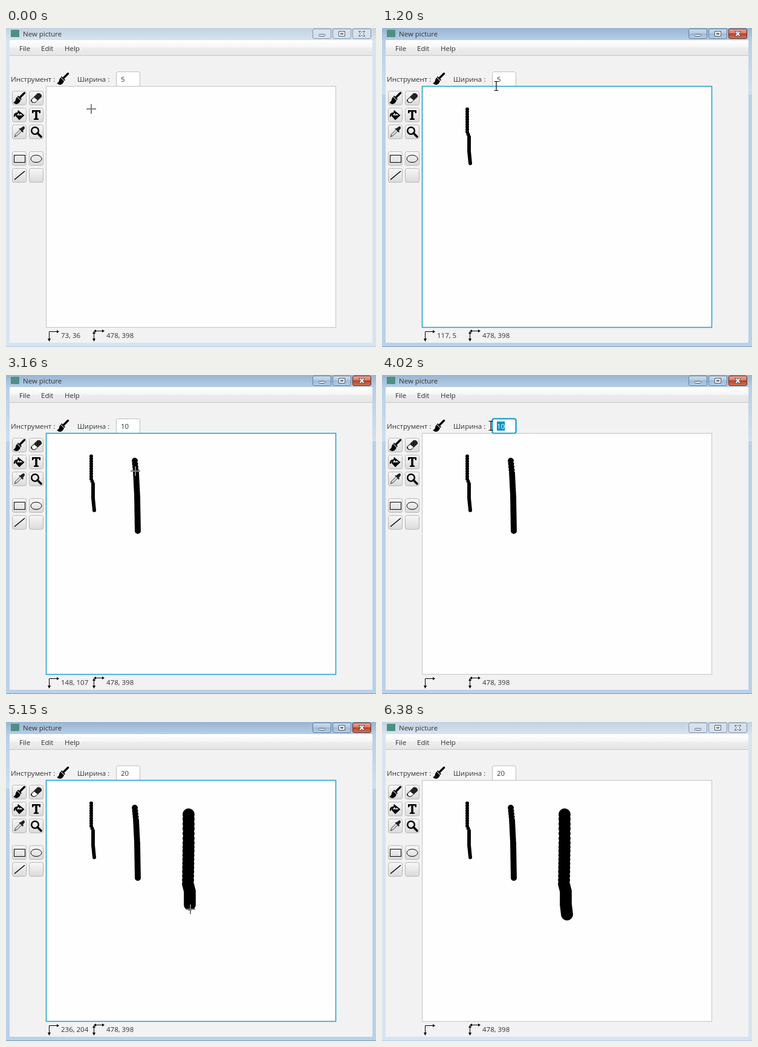
Write an HTML page that moves like this. It is 612 px wide and 528 px high and loops after 6.44 s.

```html
<!DOCTYPE html>
<html lang="ru">
<head>
<meta charset="utf-8">
<title>New picture</title>
<style>
html, body { margin: 0; width: 100%; height: 100%; overflow: hidden; background: #d7e4f1; }
svg { display: block; width: 612px; height: 528px; }
text { font: 11.5px "Open Sans", "Noto Sans", sans-serif; fill: #333; white-space: pre; }
.line { fill: none; stroke: #000; }
.dab { fill: none; stroke: #000; stroke-linecap: round; }
.hidden { display: none; }
</style>
</head>
<body>
<svg viewBox="0 0 612 528">
  <defs>
    <linearGradient id="idle" x2="0" y2="1">
      <stop stop-color="#c4d1de"/><stop offset=".04" stop-color="#d7e4f1"/>
    </linearGradient>
    <linearGradient id="live" x2="0" y2="1">
      <stop stop-color="#98b5d2"/><stop offset=".04" stop-color="#b8cfe7"/>
      <stop offset=".208" stop-color="#cfe0f1"/><stop offset=".208" stop-color="#b9d1ea"/>
    </linearGradient>
    <linearGradient id="menu" x2="0" y2="1">
      <stop stop-color="#fff"/><stop offset=".45" stop-color="#f6f6f6"/>
      <stop offset=".5" stop-color="#ededed"/><stop offset="1" stop-color="#e5e5e5"/>
    </linearGradient>
    <linearGradient id="btn" x2="0" y2="1">
      <stop stop-color="#f7f7f7"/><stop offset="1" stop-color="#dadada"/>
    </linearGradient>
    <linearGradient id="cap" x2="0" y2="1">
      <stop stop-color="#c9dbee"/><stop offset=".5" stop-color="#b3cae2"/>
      <stop offset=".5" stop-color="#9db9d6"/><stop offset="1" stop-color="#b6d0e8"/>
    </linearGradient>
    <linearGradient id="red" x2="0" y2="1">
      <stop stop-color="#e9a99b"/><stop offset=".5" stop-color="#d5735d"/>
      <stop offset=".5" stop-color="#bf3d22"/><stop offset="1" stop-color="#d5785a"/>
    </linearGradient>
    <g id="brush">
      <path d="M18.5 1.5L11.5 8.5" stroke="#000" stroke-width="3.4" stroke-linecap="round"/>
      <path d="M8 6L14 12L12.6 13.2L6.8 7.4Z"/>
      <path d="M6 8L12 14Q10 19 6 20Q3 20 0 17.5Q4 15.5 4 12Z"/>
    </g>
  </defs>

  <rect id="frame" width="612" height="528"/>
  <path id="edge" d="M0 527.5H612" stroke="#7f9cb8"/>
  <rect x="8" y="3" width="14" height="12" fill="#4f8f83"/>
  <text x="28" y="14">New picture</text>
  <g id="caption" fill="#fff" stroke="#4d5663">
    <rect x="10.5" y="10.5" width="10" height="3" rx="1"/>
    <path d="M10.5 5.5h10v8h-10zM13.5 8.5v2h4v-2z" fill-rule="evenodd"/>
    <path d="M10.5 5.5h3l2 2l2-2h3l-3 4l3 4h-3l-2-2l-2 2h-3l3-4z"/>
  </g>

  <rect x="6" y="20" width="600" height="501" fill="#f2f2f2"/>
  <rect x="6" y="20" width="600" height="26" fill="url(#menu)"/>
  <path d="M6 45.5H606" stroke="#c6c6c6"/>
  <text x="22" y="38">File</text><text x="58" y="38">Edit</text><text x="97" y="38">Help</text>

  <text x="8" y="89">Инструмент :</text>
  <use href="#brush" x="84" y="74"/>
  <text x="118" y="89">Ширина :</text>

  <g id="tools">
    <use href="#brush"/>
    <g><path d="M1 13L12 2h4l3 3v3L8 18H4L1 15z" fill="#222"/><path d="M2.5 13l4-4l5.500 4.500l-4.500 3.500h-3z" fill="#fff"/></g>
    <g><path d="M9 4l8 6.500L10 17L4.500 11zM11 9L8 2.500" fill="#fff" stroke="#000" stroke-width="2"/><path d="M5 10.500h12L10 17zM5 6Q0 7 1 14Q3 13 4 9l4-3z"/></g>
    <path d="M3 2h14v5h-2l-1-2.500h-2.300v11l2.300.5v2H6v-2l2.300-.5v-11H6L5 7H3z"/>
    <g><path d="M9 4.500L15.500 11L17 9.500L16 8l3-4Q19 0 16 1l-4 3z" fill="#222"/><path d="M11 6.500l-7 7L2 18l4.500-2l7-7" fill="#ddd" stroke="#333"/></g>
    <g class="line"><circle cx="8" cy="8" r="5.800" stroke-width="2.400"/><path d="M12 12l6 6" stroke-width="3.600" stroke-linecap="round"/></g>
    <rect class="line" x="1.500" y="4.500" width="18" height="12"/>
    <ellipse class="line" cx="10" cy="10.500" rx="9" ry="6"/>
    <path class="line" d="M2 17L19 3" stroke-width="1.600"/>
    <g></g>
  </g>

  <g id="field">
    <rect id="box" x="182.5" y="72.5" width="39" height="24" rx="3" fill="#fff"/>
    <rect id="sel" x="190" y="77" height="15" fill="#0093c8"/>
    <text id="size" x="190" y="89"></text>
    <path id="caret" stroke="#000"/>
  </g>
  <rect id="sheet" x="66.5" y="96.5" width="479" height="399" fill="#fefefe"/>
  <use href="#field" id="fieldTop"/>
  <path class="dab" stroke-width="6"/>
  <path class="dab" stroke-width="10"/>
  <path class="dab" stroke-width="20"/>

  <path class="line" d="M71.5 516V502.5H86M145.5 504V516M147 501.5H161"/>
  <path d="M69 514h5l-2.5 5zM84 500v5l4-2.5zM143 506h5l-2.5-4zM143 514h5l-2.5 5zM149 499v5l-4-2.5zM159 499v5l4-2.5z"/>
  <text id="pos" x="91" y="513"></text>
  <text x="166" y="513">478, 398</text>

  <g id="cursor">
    <path id="cross" d="M-8 0H8M0-8V8" stroke="#808080" stroke-width="2"/>
    <path id="beam" class="line" d="M-3.5-7.5h7M0-7.5v15M-3.5 7.5h7" stroke-width="1.2"/>
    <path id="arrow" d="M0 0v16l4-3.5l2.500 5.500l2.500-1l-2.500-5.500h5z" fill="#fff" stroke="#000"/>
  </g>
</svg>
<script>
const LOOP = 6440, STEP = 60;
const $ = id => document.getElementById(id);
const show = (id, on) => $(id).classList.toggle('hidden', !on);
const set = (id, attrs) => { for (const k in attrs) $(id).setAttribute(k, attrs[k]); };

// Puts a glyph on a button plate
function plate(glyph, x, y, look) {
  const g = document.createElementNS('http://www.w3.org/2000/svg', 'g');
  g.innerHTML = `<rect x=".5" y=".5" ${look}/>`;
  g.setAttribute('transform', `translate(${x} ${y})`);
  glyph.replaceWith(g);
  g.append(glyph);
  return g.firstChild;
}
[...$('tools').children].forEach((icon, i) => {
  icon.setAttribute('transform', 'translate(2 2)');
  plate(icon, 10 + 28 * (i % 2), 104 + 28 * (i >> 1) + (i > 5 ? 16 : 0),
    'width="23" height="23" rx="3" fill="url(#btn)" stroke="#b8b8b8"');
});
const caps = [...$('caption').children].map((g, i) => {
  g.setAttribute('transform', 'translate(0 -1)');
  return plate(g, 507 + 33 * i, 1, 'width="30" height="16" rx="2.5"');
});

// Pen strokes: time, x, y, dab gap up to this point
const thin = [[430, 141, 134.4], [700, 141, 172, 4], [760, 144, 180, 4], [850, 144, 204, 1], [960, 146, 224, 1]];
const middle = [[2410, 213, 142], [2560, 215, 162, 5], [2740, 217, 200, 3], [2950, 218, 258, 1]];
const thick = [[4600, 302, 153], [4760, 302, 200, 8], [4990, 301, 268, 7], [5030, 304, 280, 4], [5090, 304, 302, 3], [5210, 306, 318.5, 1]];

// Pointer moves between the strokes
const toField = [[1020, 146, 224], [1140, 185, 103], [1200, 189, 96], [1320, 204, 84], [1500, 180, 84]];
const toMiddle = [[1780, 180, 84], [1980, 219, 164], [2040, 219, 174], [2350, 213, 142]];
const backUp = [[3040, 218, 258], [3100, 216, 205], [3160, 214, 159], [3280, 205, 86], [3560, 180, 84]];
const toThick = [[4190, 180, 84], [4360, 257, 128], [4540, 302, 153]];
const leave = [[5330, 306, 318], [5700, 519, 495], [5820, 550, 510]];

const strokes = [thin, middle, thick];
const path = [thin, toField, toMiddle, middle, backUp, toThick, thick, leave].flat();

// Interface states: time, focus, width text, mark in the field
const states = [
  [0, '', '5', ''], [430, 'sheet', '5', ''], [1320, 'field', '5', 'caret'], [1440, 'field', '5', 'sel'],
  [1620, 'field', '1', 'caret'], [1740, 'field', '10', 'caret'], [2410, 'sheet', '10', ''],
  [3340, 'field', '10', 'caret'], [3460, 'field', '10', 'sel'], [4070, 'field', '2', 'caret'],
  [4190, 'field', '20', 'caret'], [4600, 'sheet', '20', ''], [6380, '', '20', '']
];

// Screen updates come in bursts of equal steps
const bursts = [0, 430, 1080, 1740, 2410, 3100, 3770, 4420, 5090, 5760];
function snap(t) {
  const from = bursts.findLast(b => b <= t);
  return from + Math.floor((t - from) / STEP) * STEP;
}

const mix = (a, b, k) => [a[1] + (b[1] - a[1]) * k, a[2] + (b[2] - a[2]) * k];

function at(t) {
  const i = path.findIndex(p => p[0] > t);
  if (i === 0) return path[0].slice(1, 3);
  if (i < 0) return path.at(-1).slice(1, 3);
  const a = path[i - 1], b = path[i];
  return mix(a, b, (t - a[0]) / (b[0] - a[0]));
}

function trail(pts, t) {
  let d = `M${pts[0][1]} ${pts[0][2]}h0`;
  pts.slice(1).forEach((b, i) => {
    const a = pts[i];
    const n = Math.max(1, Math.round(Math.hypot(b[1] - a[1], b[2] - a[2]) / b[3]));
    for (let j = 1; j <= n; j++) {
      if (a[0] + (b[0] - a[0]) * j / n > t) return;
      d += 'M' + mix(a, b, j / n).map(v => v.toFixed(1)) + 'h0';
    }
  });
  return d;
}

const inSheet = ([x, y]) => x > 66 && x < 546 && y > 97 && y < 496;

function draw(time) {
  const t = snap(time), late = Math.max(0, t - STEP);
  const [, focus, text, mark] = states.findLast(s => s[0] <= time);
  const live = focus !== '', editing = focus === 'field';

  set('frame', { fill: live ? 'url(#live)' : 'url(#idle)' });
  set('edge', { opacity: live ? 1 : .35 });
  caps.forEach((c, i) => {
    c.setAttribute('fill', !live ? '#d5e1ee' : i === 2 ? 'url(#red)' : 'url(#cap)');
    c.setAttribute('stroke', !live ? '#8795a5' : i === 2 ? '#5c2a25' : '#64809d');
  });

  set('sheet', focus === 'sheet' ? { stroke: '#1a9fcb', 'stroke-width': 1.5 } : { stroke: '#c4c4c4', 'stroke-width': 1 });
  set('box', editing ? { stroke: '#1a9fcb', 'stroke-width': 2 } : { stroke: '#bdbdbd', 'stroke-width': 1 });
  show('fieldTop', focus !== 'sheet');
  const width = text.length * 6.58;
  $('size').textContent = text;
  $('size').style.fill = mark === 'sel' ? '#fff' : '#333';
  set('sel', { width });
  set('caret', { d: `M${Math.round(190 + width) + .5} 77V92` });
  show('sel', mark === 'sel');
  show('caret', mark === 'caret');

  document.querySelectorAll('.dab').forEach((dab, i) =>
    dab.setAttribute('d', t >= strokes[i][0][0] ? trail(strokes[i], late) : ''));

  const here = at(t), seen = at(late), over = inSheet(here);
  $('pos').textContent = inSheet(seen) && t < 5760 ? `${Math.round(seen[0] - 68)}, ${Math.round(seen[1] - 98)}` : '';
  set('cursor', { transform: `translate(${here.map(Math.round)})` });
  show('cursor', time < 5880);
  show('cross', over);
  show('beam', !over && t < 5700);
  show('arrow', !over && t >= 5700);
}

const start = performance.now();
function tick() {
  draw((performance.now() - start) % LOOP);
  requestAnimationFrame(tick);
}
tick();
</script>
</body>
</html>
```
